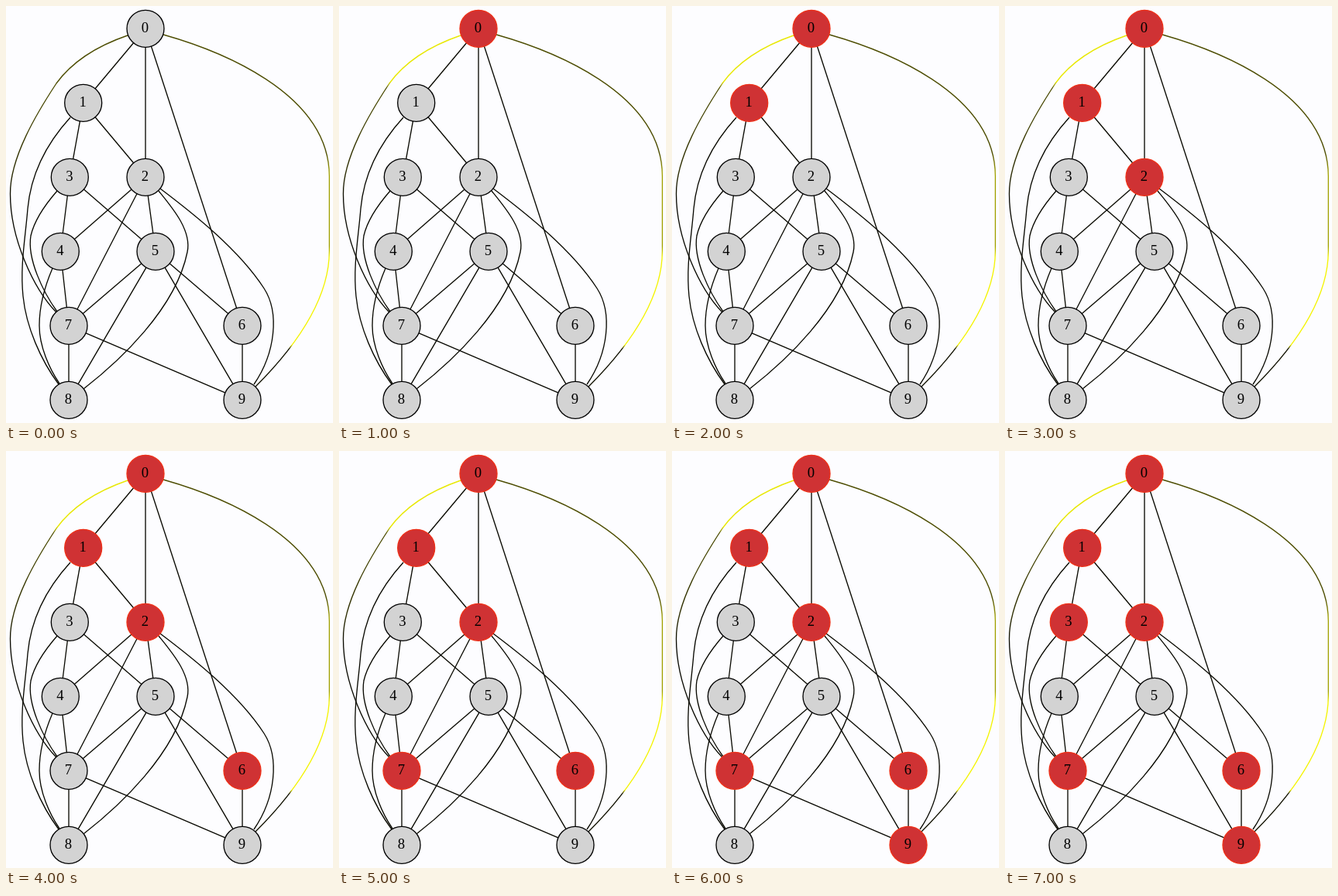
These frames come from a looping animation (422x539 px, 8000 ms). An HTML page with a canvas:

```html
<!DOCTYPE html>
<html lang="en">
<head>
<meta charset="utf-8">
<title>Graph traversal</title>
<style>
  html, body { margin: 0; width: 100%; height: 100%; overflow: hidden; background: #fdfdff; }
  canvas { display: block; }
</style>
</head>
<body>
<canvas id="stage" width="422" height="539"></canvas>
<script>
const ctx = document.getElementById('stage').getContext('2d');
const STEP = 1000, LOOP = 8000, RADIUS = 24, LINE = 1.33;

const nodes = [
  [180, 29.3], [99.7, 125.3], [180, 221.3], [82.3, 221.3], [70.3, 317.3],
  [193, 317.3], [305, 413.3], [81, 413.3], [81, 509.3], [305, 509.3]
];
const visitOrder = [0, 1, 2, 6, 7, 9, 3];

const straight = '01 02 06 13 12 34 35 24 25 27 47 57 58 56 59 78 79 69'.split(' ');
const curves = [
  'M83 144C52 178 32 218 28 262C25 300 18 335 22 375C26 415 45 458 68 489', // 1-8
  'M66 239C52 255 37 275 32 297C27 327 48 370 66 395',                     // 3-7
  'M60 339C51 360 43 388 43 413C43 440 56 469 69 488',                     // 4-8
  'M197 239C214 260 240 290 234 318C219 392 145 460 100 495',              // 2-8
  'M199 236C240 267 300 314 333 365C353 396 348 448 320 489'               // 2-9
].map(d => new Path2D(d));
const leftArc = new Path2D('M157 38C128 48 89 67 65 100C40 138 5 196 5.5 243C5.5 300 35 365 65 396');
const rightArc = new Path2D('M203 37C270 56 417 110 417.3 220L417.3 317C417 387 361 453 322 492');

function verticalGradient(stops) {
  const g = ctx.createLinearGradient(0, 0, 0, 539);
  for (const [y, color] of stops) g.addColorStop(y / 539, color);
  return g;
}
const rightInk = verticalGradient([
  [37, '#4c4c00'], [190, '#4c4c00'], [215, '#a0a000'], [310, '#a0a000'],
  [325, '#f4f400'], [438, '#f4f400'], [443, '#101000']
]);
const leftInks = ['#4c4c00', '#e8e800'].map(top =>
  verticalGradient([[38, top], [98, top], [106, '#4c4c00'], [215, '#2a2a00'], [250, '#080800']]));

function strokePath(path, color) {
  ctx.strokeStyle = color;
  ctx.stroke(path);
}

function drawEdges(started) {
  ctx.lineWidth = LINE;
  for (const [a, b] of straight) {
    const line = new Path2D();
    line.moveTo(...nodes[a]);
    line.lineTo(...nodes[b]);
    strokePath(line, '#080800');
  }
  for (const path of curves) strokePath(path, '#080800');
  strokePath(leftArc, leftInks[started ? 1 : 0]);
  strokePath(rightArc, rightInk);
}

function drawNode([x, y], label, visited) {
  ctx.beginPath();
  ctx.arc(x, y, RADIUS, 0, Math.PI * 2);
  ctx.fillStyle = visited ? '#cf3234' : '#d3d3d3';
  ctx.fill();
  ctx.lineWidth = LINE;
  ctx.strokeStyle = visited ? '#ee3018' : '#000';
  ctx.stroke();
  ctx.fillStyle = '#000';
  ctx.fillText(label, x - 0.5, y + 5);
}

function render(now) {
  const count = Math.floor((now % LOOP) / STEP);
  const visited = new Set(visitOrder.slice(0, count));
  ctx.fillStyle = '#fdfdff';
  ctx.fillRect(0, 0, 422, 539);
  ctx.font = '18.67px "Liberation Serif", "Times New Roman", serif';
  ctx.textAlign = 'center';
  drawEdges(count > 0);
  nodes.forEach((node, i) => drawNode(node, String(i), visited.has(i)));
}

const start = performance.now();
function tick() {
  render(performance.now() - start);
  requestAnimationFrame(tick);
}
tick();
</script>
</body>
</html>
```
